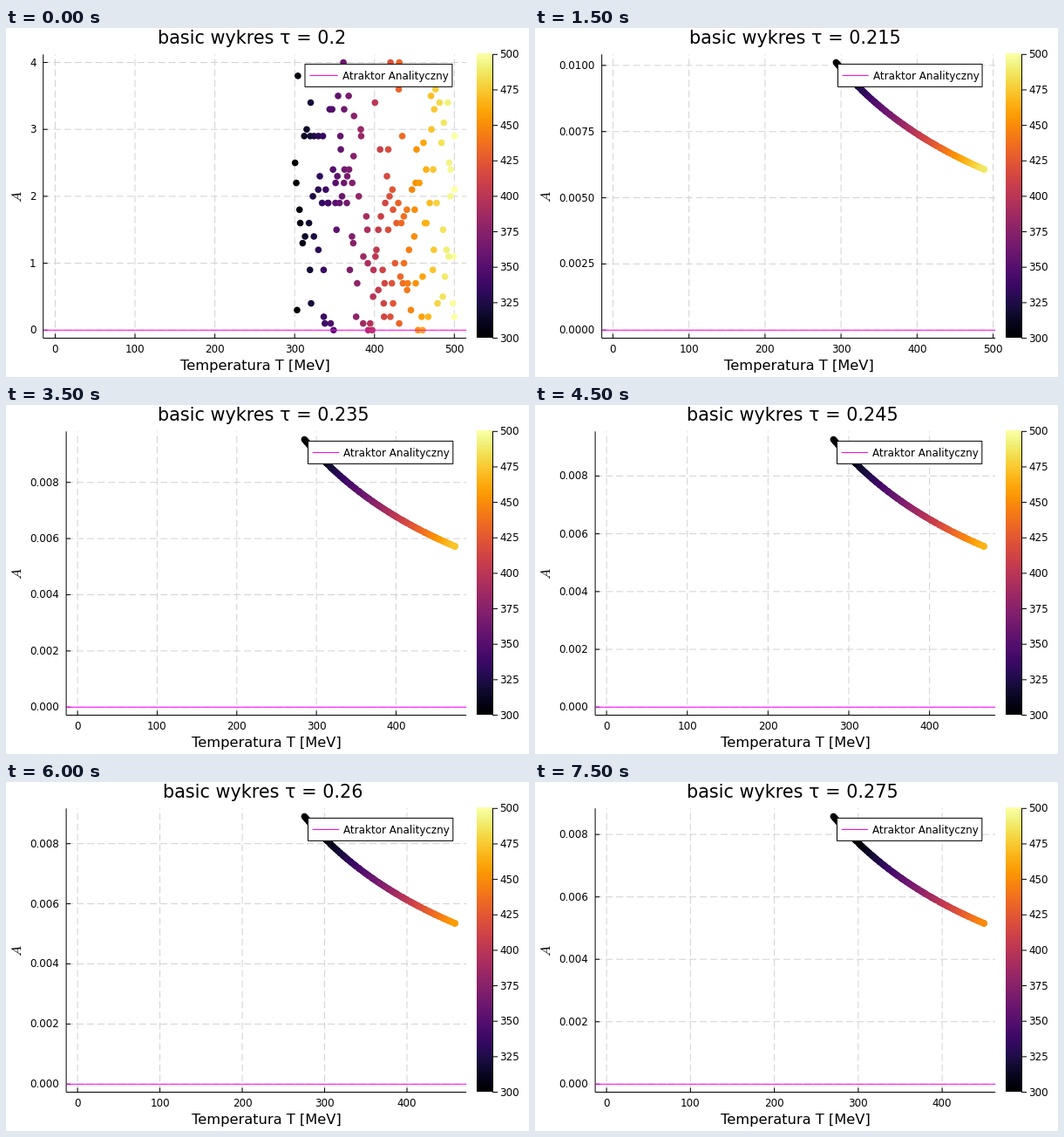
These frames come from a looping animation (600 px wide and 400 px high, 8 s). A matplotlib script:

```python
import math
import numpy as np
import matplotlib.pyplot as plt
from matplotlib.animation import FuncAnimation
from matplotlib.patches import Rectangle

plt.rcParams.update({"font.family": "DejaVu Sans", "mathtext.fontset": "cm",
                     "path.snap": False})

W, H = 600, 400
PX = 0.72                      # points per pixel at 100 dpi
STEPS, DTAU, TAU0 = 16, 0.005, 0.2
RIGHT, TOP, BOTTOM = 528.1, 30.3, 355.5
PAD = 0.03
COUNT = 165
TITLE, GUIDE, TICK = (s * 1.482 * PX for s in (14, 11, 8))

# Outermost starting points: temperature [MeV], anisotropy
EDGE = [(300.5, 2.5), (302, 2.2), (303, 0.3), (304, 3.8), (306, 1.8),
        (307, 1.6), (310, 1.3), (312, 2.9), (313, 1.4), (315, 3.0),
        (361, 4.0), (420, 4.0), (431, 4.0),
        (499, 1.1), (500, 0.2), (500, 2.1), (500, 2.9)]

# Second-order hydrodynamics coefficients
C_ETA = 1 / (4 * math.pi)
C_TAU = (2 - math.log(2)) / (2 * math.pi)


def initial_state():
    rng = np.random.default_rng(5)
    n = COUNT - len(EDGE)
    temp = np.linspace(317, 497, n) + rng.uniform(-1.5, 1.5, n)
    aniso = rng.integers(0, 40, n) / 10
    return np.hstack([np.array(EDGE).T, [temp, aniso]])


def slope(tau, state):
    t, a = state
    dt = t / tau * (a / 18 - 1 / 3)
    da = t / C_TAU * (8 * C_ETA / (tau * t) - a) - 2 * a**2 / (9 * tau)
    return np.array([dt, da])


def evolve(tau, state, substeps=50):
    h = DTAU / substeps
    for _ in range(substeps):
        k1 = slope(tau, state)
        k2 = slope(tau + h / 2, state + h / 2 * k1)
        k3 = slope(tau + h / 2, state + h / 2 * k2)
        k4 = slope(tau + h, state + h * k3)
        state = state + h / 6 * (k1 + 2 * k2 + 2 * k3 + k4)
        tau += h
    return state


states = [initial_state()]
for n in range(STEPS - 1):
    states.append(evolve(TAU0 + n * DTAU, states[-1]))

fig = plt.figure(figsize=(W / 100, H / 100), dpi=100, facecolor="white")
ax = fig.add_axes([0, 0, 1, 1])


def line(x, y, color="black", z=3, **kw):
    ax.plot(x, y, color=color, lw=PX, zorder=z, solid_capstyle="butt",
            snap=False, **kw)


def text(x, y, s, size, ha="center", z=6, **kw):
    ax.text(x, y, s, fontsize=size, ha=ha, zorder=z,
            **{"va": "baseline", **kw})


def y_step(top):
    if top > 1:
        return 1, 0
    if top > 0.0125:
        return 0.005, 3
    if top >= 0.01:
        return 0.0025, 4
    return 0.002, 3


def draw_colorbar():
    ramp = np.linspace(1, 0, 256)[:, None]
    ax.imshow(ramp, cmap="inferno", extent=(540, 558, BOTTOM, TOP),
              aspect="auto", interpolation="bilinear", zorder=2)
    line([558.5, 558.5], [TOP, BOTTOM])
    for v in range(300, 501, 25):
        y = BOTTOM - (v - 300) / 200 * (BOTTOM - TOP)
        line([558, 564], [y, y])
        text(566.3, y + 4, str(v), TICK, ha="left")


def draw_legend(left):
    width = RIGHT - left
    gap = width / 90
    right = RIGHT - width / 30
    label = right - gap - 120.4
    key = label - gap
    x0, y0 = key - width / 15 - gap, TOP + 11.1
    ax.add_patch(Rectangle((x0, y0), right - x0, 26, fc="white",
                           ec="black", lw=PX, zorder=5, snap=False))
    line([key - width / 15, key], [54.5, 54.5], "magenta", 6)
    text(label, 59, "Atraktor Analityczny", TICK, ha="left")


def draw(n):
    ax.clear()
    ax.axis("off")
    temp, aniso = states[n]
    t_max, a_max = temp.max(), aniso.max()
    step, digits = y_step(a_max * (1 + PAD))
    left = 42.7 + (3.77 + 7.54 * digits if digits else 0)
    sx = (RIGHT - left) / (t_max * (1 + 2 * PAD))
    sy = (BOTTOM - TOP) / (a_max * (1 + 2 * PAD))

    def px(t):
        return left + sx * (t + PAD * t_max)

    def py(a):
        return BOTTOM - sy * (a + PAD * a_max)

    grid = dict(color="#d2d2d2", z=1, ls=(0, (8, 4)))
    for t in range(0, int(t_max * (1 + PAD)) + 1, 100):
        x = px(t)
        line([x, x], [BOTTOM, TOP], **grid)
        line([x, x], [BOTTOM, BOTTOM - 5])
        text(x, 371.6, str(t), TICK)
    for i in range(int(a_max * (1 + PAD) / step + 1e-9) + 1):
        y = py(i * step)
        line([left, RIGHT], [y, y], **grid)
        line([left, left + 5], [y, y])
        text(left - 8, y + 4, f"{i * step:.{digits}f}", TICK, ha="right")

    line([left, left], [TOP, BOTTOM])
    line([left, RIGHT], [BOTTOM, BOTTOM])
    ax.scatter(px(temp), py(aniso), s=(7.6 * PX) ** 2, c=temp,
               cmap="inferno", vmin=300, vmax=500, linewidths=0,
               zorder=3.5, snap=False)
    line([left, RIGHT], [py(0), py(0)], "magenta", 4)

    mid = (left + RIGHT) / 2
    tau = round(TAU0 + n * DTAU, 3)
    text(mid - 3.6, 18.4, f"basic wykres τ = {tau:g}", TITLE)
    text(mid + 0.6, 392, "Temperatura T [MeV]", GUIDE)
    text(13.5, 193, "$A$", GUIDE, rotation=90, va="center")

    draw_legend(left)
    draw_colorbar()
    ax.set_xlim(0, W)
    ax.set_ylim(H, 0)
    return []


anim = FuncAnimation(fig, draw, frames=STEPS, init_func=lambda: [],
                     interval=500, repeat=True, repeat_delay=0)
plt.show()
```
